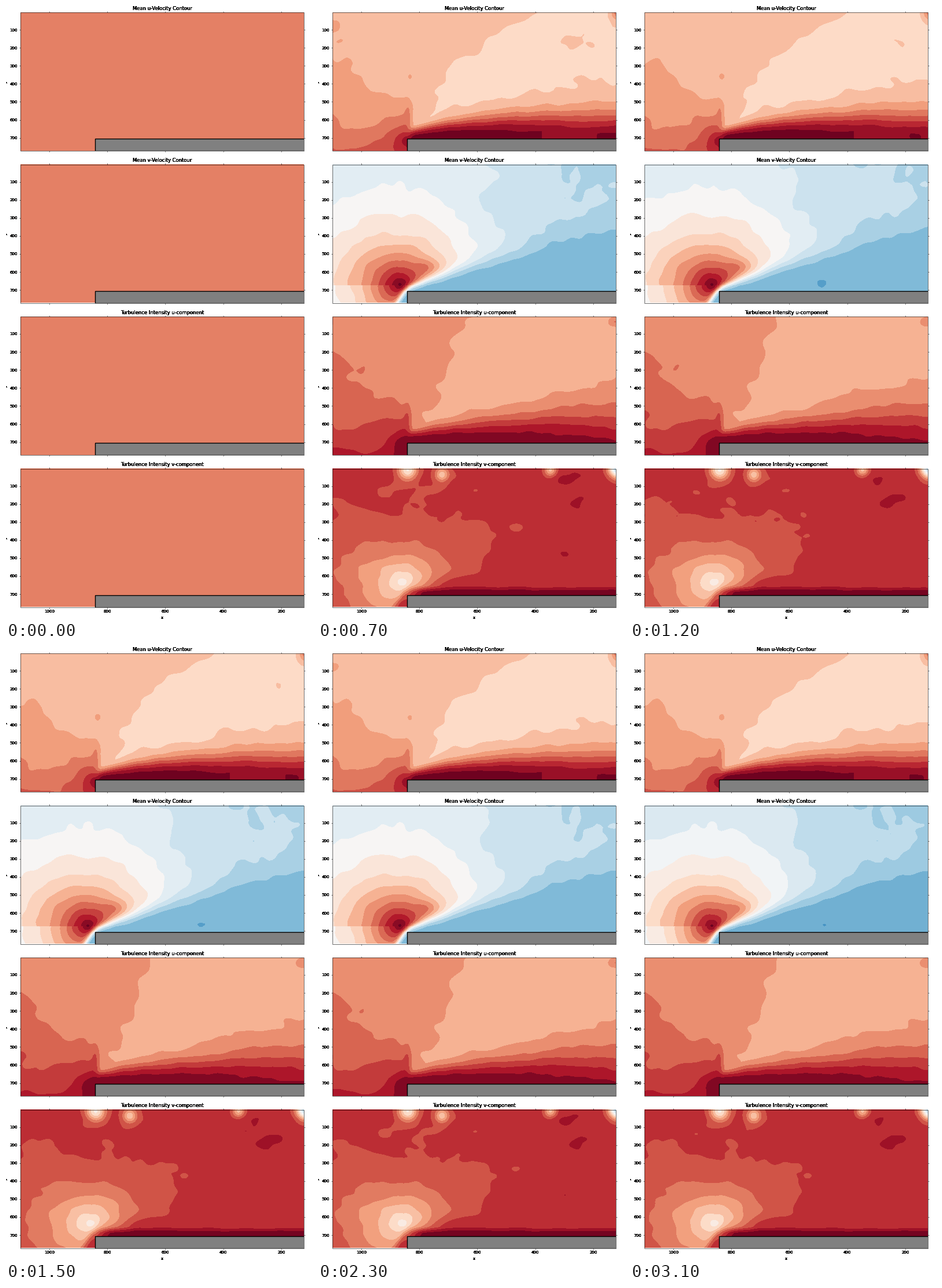
Animation of 529x1058 px, one loop 3.2 s. Source, as a matplotlib script:

```python
import numpy as np
import matplotlib as mpl
import matplotlib.pyplot as plt
from matplotlib.animation import FuncAnimation
from matplotlib.patches import Rectangle

W, H, DPI = 529, 1058, 50
FRAMES, INTERVAL = 32, 100
LEFT, RIGHT, HEIGHT = 25, 515, 239
TOP, PITCH = 11, 262.5
TITLES = ["Mean u-Velocity Contour", "Mean v-Velocity Contour",
          "Turbulence Intensity u-component", "Turbulence Intensity v-component"]
CMAP = mpl.colormaps["RdBu_r"]
EARLY, LATE = 6, 29  # steps at which the contour levels are rescaled

# Every panel shares one grid; Y counts down from the panel's top edge.
X, Y = np.meshgrid(np.arange(LEFT, RIGHT) + 0.5, np.arange(HEIGHT) + 0.5)
PLATE_X, PLATE_Y = 153.5, 218
DX = np.maximum(X - PLATE_X, 0)


def sigmoid(z):
    return 0.5 * (1 + np.tanh(z / 2))


def bump(cx, cy, sx, sy):
    return np.exp(-((X - cx) / sx) ** 2 - ((Y - cy) / sy) ** 2)


def noise(seed, waves=40):
    rng = np.random.RandomState(seed)
    out = np.zeros_like(X)
    for _ in range(waves):
        k, a, phase = rng.uniform(0.03, 0.32), *rng.uniform(0, 2 * np.pi, 2)
        out += k ** -0.8 * np.cos(k * (0.75 * np.cos(a) * X + np.sin(a) * Y) + phase)
    return out / out.std()


def contour(v, mid, step):
    """Snap v to the middle of its contour band."""
    return mid + step * np.round((v - mid) / step)


def approach():
    """Slow rise towards the floor and the plate's corner, ahead of the plate."""
    rise = 1.83 - 0.007 * X + 1.3 * np.exp((Y - 173) / 95)
    return np.maximum(rise + 4 * np.exp(-np.hypot(X - 153, Y - 221) / 25), 1.25)


def shear(centre, drop, decay, width, lo, gain):
    """Layer over the plate that lifts off at the corner and thickens."""
    middle = centre + drop * np.exp(-DX / decay)
    return lo + gain * sigmoid((Y - middle) / width)


def wake(corner, line, width):
    """Weight that is 1 behind the line shed from the plate's corner."""
    lean = 0.6 * np.maximum(Y - corner, 0)
    return sigmoid((Y - line) / width) * sigmoid((X - 152 + lean) / 3)


def polar(cx, cy):
    r = np.hypot(X - cx, Y - cy) + 1e-6
    return r, (X - cx) / r


BEHIND = sigmoid((X - 159) / 3)
AHEAD = approach()

# Mean u
SHEAR_U = shear(180, 27, 95, 4 + 0.042 * DX, 0.7, 7.4)
SHEAR_U = np.minimum(SHEAR_U, np.where(X < 387, 8, 6.85))
EDGE_U = 195 + 190 * np.clip((179 - Y) / 179, 0, 1) ** 2
EXTRA_U = 0.8 * bump(159, 110, 9, 11) + 0.8 * bump(157, 171, 7, 22) + 3.2 * bump(519, 0, 13, 14)
PATCH_U = bump(455, 50, 70, 45)

# Mean v
R, COS = polar(142, 208.5)
R = R * np.where(Y > 208.5, 1.35, 1)
RING_V = 10.6 * np.exp(-R / (75 + 20 * np.maximum(-COS, 0))) - 1.2
RING_V += 1.2 * bump(188, 178, 24, 14) - 0.9 * sigmoid((X - 310) / 40)
WAKE_V = wake(214, 214.5 - 0.62 * DX ** 0.88, 3 + 0.04 * DX)

# Turbulence u
SHEAR_T = shear(174, 29, 130, 4 + 0.06 * DX, 0.5, 5.6)
EDGE_T = 189 + 75 * np.clip(1 - Y / 182, 0, 1) ** 1.2
EXTRA_T = 0.8 * bump(155, 172, 7, 20) + 1.6 * bump(513, 9, 12, 9)

# Turbulence v
R, COS = polar(148, 197.5)
REACH = 50 * (1 + 0.55 * np.maximum(-COS, 0) ** 1.5 + 0.25 * np.maximum(COS, 0))
TURB_V = 0.5 - 6.2 * np.exp(-R / REACH) * (1 - wake(207, 211 - 0.25 * DX, 6))
TURB_V += 2.2 * np.clip((Y - 203) / 10, 0, 1) * np.clip((X - 155) / 25, 0, 1)
TURB_V += 0.45 * bump(445, 50, 65, 42) + 0.45 * bump(380, 143, 40, 14)
for cx, cy, size, depth in [(155, 3, 16, 5.5), (214, 11, 12, 4), (402, 3, 11, 4), (519, 0, 16, 10)]:
    TURB_V -= depth * bump(cx, cy, size, size)

NOISE = [[noise(10 * p + j) for j in range(3)] for p in range(4)]


def wobble(p, i):
    """Fixed roughness plus a part that settles as the average converges."""
    base, a, b = NOISE[p]
    return 0.1 * base + 0.14 / np.sqrt(i) * (a * np.cos(0.4 * i) + b * np.sin(0.4 * i))


def flow(layer, edge, floor, patch=0):
    """Join the plate's layer, the pale outer stream and the approach."""
    outer = np.clip(1 + (edge - X) / 60, floor, 1.45) + patch
    return AHEAD * (1 - BEHIND) + np.maximum(outer, layer) * BEHIND


def values(i):
    """Colour map position of every panel at step i."""
    if i == 0:
        return [np.full_like(X, 0.75)] * 4
    early, late = i < EARLY, i >= LATE
    sway = -20 * i / 26 * (1 + np.cos(2 * np.pi * (i - 4) / 11))

    k = flow(SHEAR_U, EDGE_U + sway * np.clip((139 - Y) / 100, 0, 1), 0.45,
             (0.55 - 0.008 * i) * PATCH_U) + EXTRA_U + wobble(0, i)
    u = 0.572 + 0.055 * np.clip(k, 0, 7.9)
    u = contour(u - 0.03, 0.58, 0.05) if early else contour(u, 0.6, 0.055)

    depth = -4.5 if early else -3.75
    k = RING_V * (1 - WAKE_V) + depth * WAKE_V + wobble(1, i)
    v = contour(0.477 + 0.056 * k, 0.505, 0.056) - 0.02 * late

    k = flow(SHEAR_T, EDGE_T + 0.3 * sway, 0.4) + EXTRA_T + wobble(2, i)
    tu = contour(0.645 + 0.058 * np.clip(k, 0, 5.9), 0.674, 0.058)

    k = np.minimum(TURB_V + 1.2 * wobble(3, i), 2.5)
    tv = contour(0.8425 + 0.055 * k, 0.87, 0.055)
    return [u, v, tu, tv]


fig = plt.figure(figsize=(W / DPI, H / DPI), dpi=DPI, facecolor="white")
ax = fig.add_axes([0, 0, 1, 1])
ax.axis("off")


def label(x, y, text, size=10, **kw):
    for _ in range(5):  # overprinting gives the heavy look
        ax.text(x, y, text, fontsize=size, family="DejaVu Sans", **kw)


def line(x0, x1, y0, y1):
    ax.plot([x0, x1], [y0, y1], color="black", lw=0.8, solid_capstyle="butt")


TICK = 2.43
CENTRE = (LEFT + RIGHT) / 2
images = []
for p, title in enumerate(TITLES):
    top = TOP + p * PITCH
    bottom = top + HEIGHT
    images.append(ax.imshow(np.ones((HEIGHT, RIGHT - LEFT, 3)), interpolation="nearest",
                            extent=(LEFT, RIGHT, bottom, top), aspect="auto"))
    frame = Rectangle((LEFT, top), RIGHT - LEFT, HEIGHT, fill=False, ec="black", lw=0.8, zorder=4)
    ax.add_patch(frame)
    plate = Rectangle((PLATE_X, top + PLATE_Y), 400, HEIGHT - PLATE_Y,
                      fc="gray", ec="black", lw=2, zorder=3)
    ax.add_patch(plate)
    plate.set_clip_path(frame)
    for n in range(1, 8):
        y = top + 30 + 31.1 * (n - 1)
        line(LEFT - TICK, LEFT, y, y)
        line(RIGHT, RIGHT + TICK, y, y)
        label(LEFT - 2 * TICK, y, str(100 * n), ha="right", va="center_baseline")
    for n in range(5):
        x = 75 + 100.2 * n
        line(x, x, top - TICK, top)
        line(x, x, bottom, bottom + TICK)
        if p == 3:
            label(x, bottom + 2 * TICK, str(1000 - 200 * n), ha="center", va="top")
    label(CENTRE, top - 4.2, title, 12, ha="center", va="baseline")
    label(3, top + HEIGHT / 2, "y", rotation=90, ha="right", va="center")
label(CENTRE, H, "x", ha="center", va="baseline")
ax.set_xlim(0, W)
ax.set_ylim(H, 0)


def update(i):
    for image, value in zip(images, values(i)):
        image.set_data(CMAP(value)[..., :3])
    return images


anim = FuncAnimation(fig, update, frames=FRAMES, interval=INTERVAL, repeat=True, repeat_delay=0)
plt.show()
```
